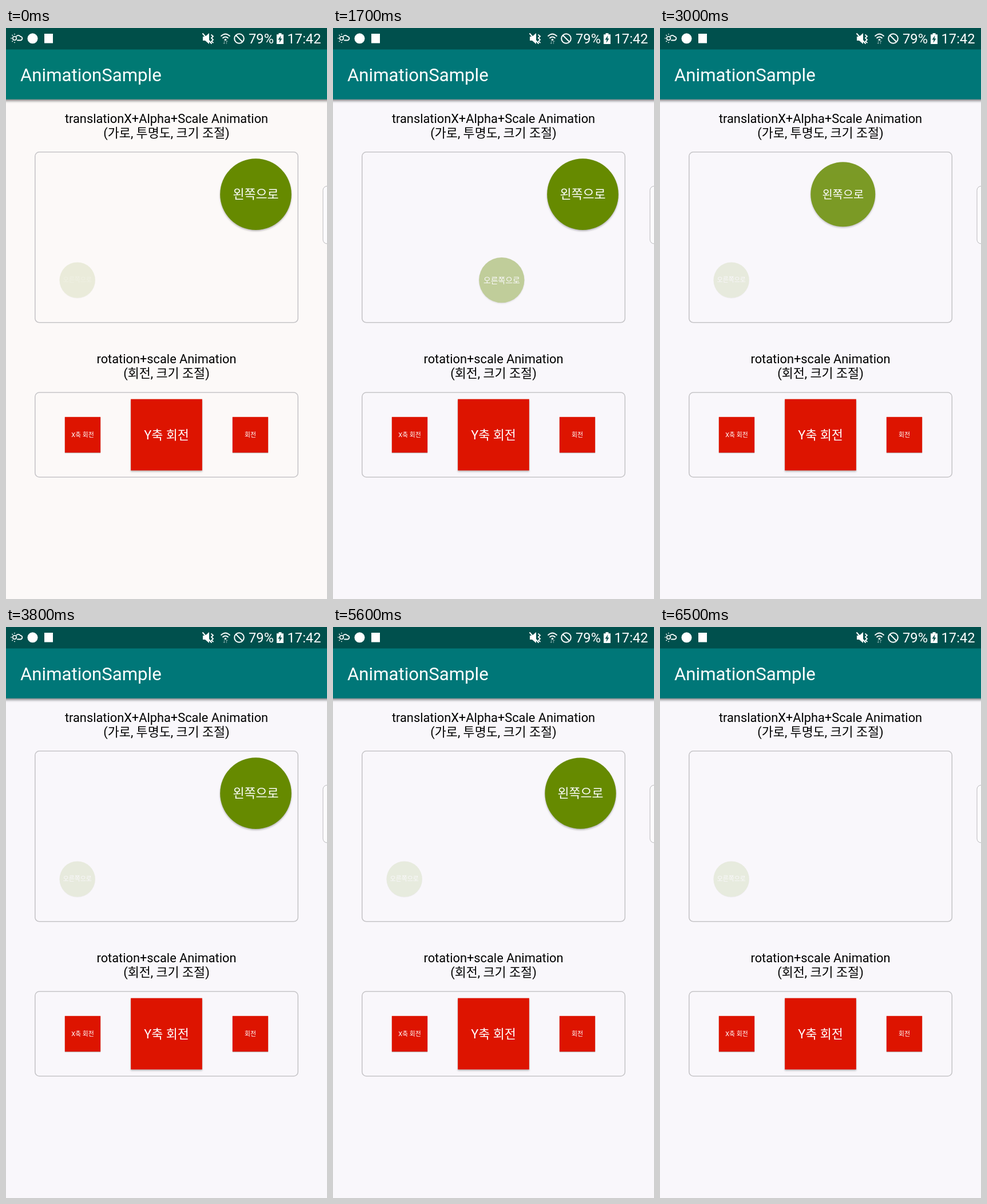
An HTML page for the animation above (6.6 s loop, 561 by 998 pixels).

```html
<!DOCTYPE html>
<html lang="ko">
<head>
<meta charset="utf-8">
<title>AnimationSample</title>
<style>
  html, body { margin: 0; width: 100%; height: 100%; overflow: hidden; }
  svg { display: block; width: 100%; height: 100%; }
  text { font: 21.8px Roboto, "Noto Sans CJK KR", "Noto Sans CJK", sans-serif; }
  .mid { text-anchor: middle; }
  .white { fill: #fff; }
  .status { font-size: 23.7px; fill: #fff; }
  .frame { fill: none; stroke: #c6c5c8; stroke-width: 1.6; }
  .shape { filter: drop-shadow(0 2px 1.5px #0004); }
  .icon { fill: none; stroke: #fff; stroke-width: 2; stroke-linecap: round; }
</style>
</head>
<body>
<svg viewBox="0 0 561 998">
  <defs>
    <clipPath id="panel"><rect x="50" y="216" width="461" height="299.5"/></clipPath>
    <filter id="soft" x="-5%" y="-20%" width="110%" height="150%"><feGaussianBlur stdDeviation="2"/></filter>
  </defs>
  <rect id="page" width="561" height="998"/>

  <rect x="-10" y="60" width="581" height="67.5" fill="#0007" filter="url(#soft)"/>
  <rect id="bar" y="37" width="561" height="87.7"/>
  <rect id="top" width="561" height="37.5"/>
  <text x="25" y="93" class="white" style="font-size:31.2px">AnimationSample</text>

  <!-- status icons -->
  <g class="icon">
    <circle cx="15" cy="18" r="3.2" stroke-width="1.6"/>
    <path stroke-width="1.6" d="M9 18h.6M11 12.5l.5.5M15 10.5v.5M11 23.5l.5-.5M15 25.5v-.5"/>
    <path stroke-width="1.8" d="M20 21.5h5a3.3 3.3 0 0 0 0-6.7a4.2 4.2 0 0 0-6.5-.6"/>
    <circle cx="407.500" cy="18.500" r="8.300"/>
    <path d="M402 13l11 11"/>
    <path d="M344 10l15 17"/>
    <path stroke-width="1.800" d="M359 12l3 2.500-3 3 3 3-3 3 3 2"/>
    <path d="M376 14q7.500-7 15 0M379 17.500q4.500-4 9 0" stroke-width="1.800"/>
  </g>
  <g fill="#fff">
    <circle cx="46.5" cy="18.3" r="9"/>
    <rect x="67" y="10" width="15" height="16.500"/>
    <path d="M344 15h4l7-6v19l-7-6h-4z"/>
    <circle cx="383.500" cy="20.500" r="1.800"/>
    <path d="M381 22v4h-2l2.500 2 2-2h-1.500v-4zM385 28v-4h-1.500l2.500-2 2 2h-2v4z" opacity=".45"/>
    <path d="M476.500 9h5v2.200h3.500v16.800h-12V11.200h3.500z"/>
    <path d="M480.500 13l-5 7.500h3l-1 5.500 5-7.500h-3z" fill="#00504c"/>
  </g>
  <text x="424" y="27" class="status">79%</text>
  <text x="491.500" y="27" class="status">17:42</text>

  <g class="mid">
    <text x="280.500" y="165.500">translationX+Alpha+Scale Animation</text>
    <text x="280.500" y="191">(가로, 투명도, 크기 조절)</text>
    <text x="280.500" y="585.500">rotation+scale Animation</text>
    <text x="280.500" y="611">(회전, 크기 조절)</text>
  </g>
  <rect class="frame" x="50.800" y="216.800" width="459.500" height="298" rx="7.500"/>
  <rect class="frame" x="50.800" y="637" width="459.500" height="148" rx="7.500"/>
  <rect x="554" y="276.500" width="30" height="100.500" rx="7" fill="#fcfbfd" stroke="#b9b8bb"/>

  <g id="squares" class="mid"></g>
  <g clip-path="url(#panel)" class="mid">
    <g id="right"><circle class="shape" r="62.350" fill="#668a00"/><text y="7.700" class="white">오른쪽으로</text></g>
    <g id="left"><circle class="shape" r="62.350" fill="#668a00"/><text y="7.700" class="white">왼쪽으로</text></g>
  </g>
</svg>
<script>
const LOOP = 6600, STEP = 100, DURATION = 1000, TRAVEL = 623;
const el = id => document.getElementById(id);

el('squares').innerHTML = [['X축 회전', 134, .5], ['Y축 회전', 280.5, 1], ['회전', 427, .5]]
  .map(([label, x, scale]) => `<g transform="translate(${x} 711) scale(${scale})">
    <rect class="shape" x="-62.35" y="-62.35" width="124.7" height="124.7" fill="#dd1400"/>
    <text y="7.7" class="white">${label}</text></g>`).join('');

// Accelerate-decelerate progress of whichever run is active; 0 when idle
function progress(time, starts) {
  const start = starts.find(s => time >= s && time < s + DURATION);
  return start === undefined ? 0 : (1 - Math.cos(Math.PI * (time - start) / DURATION)) / 2;
}

function place(id, x, y, scale, alpha) {
  el(id).setAttribute('transform', `translate(${x} ${y}) scale(${scale})`);
  // the shadow behind a translucent disc makes it a little denser
  el(id).setAttribute('opacity', alpha + .15 * alpha * (1 - alpha));
}

function draw(now) {
  const time = Math.floor(now % LOOP / STEP) * STEP;
  const warm = time < 1300;
  el('page').setAttribute('fill', warm ? '#fcf9f8' : '#f9f7fb');
  el('bar').setAttribute('fill', warm ? '#007973' : '#007778');
  el('top').setAttribute('fill', warm ? '#004f49' : '#00504d');
  el('right').lastChild.setAttribute('opacity', warm ? .3 : 1);

  const r = progress(time, [1350, 4150]);
  const l = progress(time, [2715, 5549]);
  place('right', 124.7 + TRAVEL * r, 440.6, .5 + .5 * r, .1 + .9 * r);
  place('left', 436.5 - TRAVEL * l, 290.7, 1 - .5 * l, 1 - .9 * l);
}

const origin = performance.now();
function tick() {
  draw(performance.now() - origin);
  requestAnimationFrame(tick);
}
tick();
</script>
</body>
</html>
```
